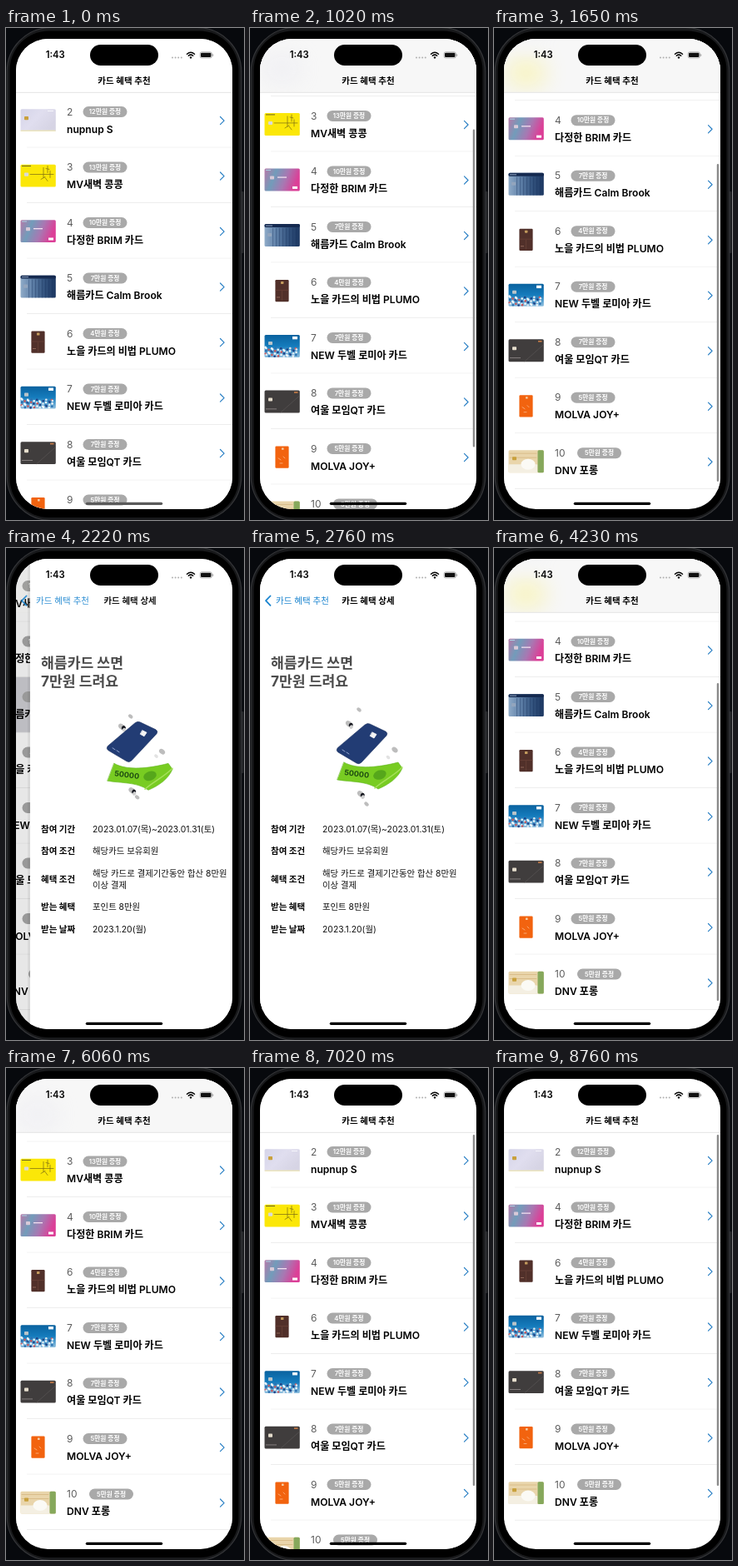
An HTML page that plays this animation: 286 px wide and 590 px high, repeating every 8.82 s.

```html
<!DOCTYPE html>
<html lang="ko">
<head>
<meta charset="utf-8">
<title>카드 혜택 추천</title>
<style>
html, body { margin: 0; width: 100%; height: 100%; overflow: hidden; background: #07090d; }
svg { display: block; width: 100%; height: 100%; }
text { font-family: Inter, "Noto Sans CJK KR", "Noto Sans CJK JP", "Noto Sans CJK", sans-serif; }
.name { font-size: 12.1px; font-weight: 600; }
.num { font-size: 12px; fill: #5c5c5c; }
.prize { font-size: 7.7px; font-weight: 600; fill: #fff; text-anchor: middle; }
.nav { font-size: 10.5px; }
.mid { text-anchor: middle; }
.bold { font-weight: 600; }
.head { font-size: 17.2px; font-weight: 700; fill: #4c4c4c; }
.label { font-size: 10.5px; font-weight: 700; }
.value { font-size: 10.4px; fill: #111; }
</style>
</head>
<body>
<svg id="stage" viewBox="0 0 286 590"></svg>
<script>
const LOOP = 8820, ROW = 66.5, TOP = 77;
const BLUE = '#1a84cf';

const clamp = x => Math.min(1, Math.max(0, x));
const smooth = x => x * x * (3 - 2 * x);
const seg = (t, a, b) => clamp((t - a) / (b - a));
const ease = (t, a, b) => smooth(seg(t, a, b));
const spring = x => x >= 1 ? 1 : 1 - (1 + 9 * x) * Math.exp(-9 * x);
const mix = (a, b, p) => a + (b - a) * p;

const rect = (x, y, w, h, fill, r = 0, more = '') =>
  `<rect x="${x}" y="${y}" width="${w}" height="${h}" rx="${r}" fill="${fill}" ${more}/>`;
const path = (d, stroke, w = 1, more = 'fill="none"') =>
  `<path d="${d}" stroke="${stroke}" stroke-width="${w}" stroke-linecap="round" stroke-linejoin="round" ${more}/>`;
const text = (x, y, cls, s, more = '') => `<text x="${x}" y="${y}" class="${cls}" ${more}>${s}</text>`;
const many = (n, f) => Array.from({ length: n }, (_, i) => f(i)).join('');
const gradient = (id, dir, ...colors) => `<linearGradient id="${id}" ${dir}>` +
  colors.map((c, i) => `<stop offset="${i / (colors.length - 1)}" stop-color="${c}"/>`).join('') +
  '</linearGradient>';

const wide = (fill, inner) => rect(17.5, 20.2, 42.3, 26.8, fill, 1.5) + inner;
const tall = (fill, inner) => rect(30.4, 20.6, 16.2, 26.2, fill, 1.2) + inner;
const chip = (x, y, c = '#c9a13c') => rect(x, y, 5, 4.2, c, .8);

// Card art in row coordinates
const art = {
  lilac: wide('url(#lilac)', chip(22, 29) + rect(17.5, 45.6, 42.3, 1.4, '#ece5bd', .7) +
    rect(50, 22, 7, 1, '#f5f5fb')),
  yellow: wide('#fbe708', chip(22, 30, '#d9dadb') + rect(19, 21.5, 11, 1, '#6d6420') +
    path('M29 32H57 M45 24v12 M50 22v8 M53 28v8 M42 38l5-3 M48 25l4 1 M47 36l3 4', '#7a6a14', .7)),
  flex: wide('url(#flex)', chip(24, 29, '#d8c9d8') + rect(33, 30, 11, 1.3, '#f3dff0') +
    rect(19, 21.5, 6, 1, '#a9d3e4') + rect(51, 41.5, 6, 3, '#fff')),
  navy: wide('url(#navy)', many(8, i => rect(27 + i * 4, 25, .7, 22, '#16305a', 0, 'opacity=".5"')) +
    rect(17.5, 20.2, 42.3, 3.8, '#152a50', 1.5) + rect(19, 21.7, 8, .9, '#9db1cc') + chip(21, 31, '#93a5bd')),
  brown: tall('#51302a', rect(37, 22.5, 3.4, 3, '#c29a5c', .6) + path('M31 33H46 M38.500 34v11', '#75483d', .5) +
    rect(32, 41, 4, 1, '#8d6456')),
  blue: wide('url(#blue)', many(46, i => `<circle cx="${18.5 + (i * 7.3) % 40}" cy="${35 + (i * 4.7) % 11}" r="1.3"
    fill="${['#f2f5f8', '#1d3f86', '#dfe9f2', '#f2f5f8', '#2c6fb0', '#c9565c'][i % 6]}"/>`) +
    chip(22, 28, '#b9c4c9') + rect(51, 22, 6, 3.4, '#fff')),
  dark: wide('#403d3d', chip(22, 29, '#e4dccb') + path('M37 46.500L59 27', '#5a5555', .7) +
    rect(19, 42, 13, .9, '#8b8585') + rect(53, 21.8, 4.5, 1.6, '#c97c46')),
  orange: tall('#f2630f', rect(38, 22.5, 2.6, 2.4, '#f5cda4', .5) +
    path('M34 35l3 2 M40 33l2 2 M36 41h3', '#fbc49c', .7)),
  wood: wide('#e9d5ab', rect(17.5, 37, 35, 10, '#f4efe2', 1) + rect(52.5, 20.2, 7.3, 26.8, '#86a85c', 1.5) +
    path('M19 24H51 M19 29H51', '#cfae75', .6) + chip(22, 28) +
    '<ellipse cx="41" cy="37" rx="8.500" ry="6.500" fill="#fbfaf5"/>')
};

const cards = [
  [2, '12만원', 'nupnup S', 'lilac', '#d9d8ea'],
  [3, '13만원', 'MV새벽 콩콩', 'yellow', '#ffec00'],
  [4, '10만원', '다정한 BRIM 카드', 'flex', '#b57aa8'],
  [5, '7만원', '해름카드 Calm Brook', 'navy', '#4a6486'],
  [6, '4만원', '노을 카드의 비법 PLUMO', 'brown', '#51302a'],
  [7, '7만원', 'NEW 두벨 로미아 카드', 'blue', '#2f7fb8'],
  [8, '7만원', '여울 모임QT 카드', 'dark', '#403d3d'],
  [9, '5만원', 'MOLVA JOY+', 'orange', '#f2630f'],
  [10, '5만원', 'DNV 포롱', 'wood', '#e9d5ab']
];

function row([num, prize, name, kind], i) {
  const bx = num > 9 ? 100 : 92.5;
  return `<g id="row${i}">
    <g id="red${i}">${rect(12, 0, 260, ROW, '#ff3b30')}
      ${text(235, 37, 'value mid', '삭제', 'style="fill:#fff"')}</g>
    <g id="face${i}">${rect(12, 0, 262, ROW, '#fff', 0, `id="back${i}"`)}
      ${art[kind]}
      ${text(73, 27.6, 'num', num)}
      ${rect(bx, 17, 53, 13, '#a9a9a9', 6.5)}
      ${text(bx + 26.5, 26.3, 'prize', prize + ' 증정')}
      ${text(73, 48.6, 'name', name)}
      ${path('M257.500 29.500l4.600 4.600l-4.600 4.600', '#2b80c5', 1.2)}
    </g>
    ${rect(25, ROW - .7, 247, .7, '#e6e6e6')}</g>`;
}

const info = [
  [341, '참여 기간', '2023.01.07(목)~2023.01.31(토)'],
  [367.3, '참여 조건', '해당카드 보유회원'],
  [400.5, '혜택 조건', '해당 카드로 결제기간동안 합산 8만원', '이상 결제'],
  [434, '받는 혜택', '포인트 8만원'],
  [461, '받는 날짜', '2023.1.20(월)']
];
const infoRow = ([y, label, a, b]) => text(25, y, 'label', label) +
  (b ? text(87, y - 7, 'value', a) + text(87, y + 7, 'value', b) : text(87, y, 'value', a));

// x, y, radius, dark side
const coins = [[131, 194, 3, 0], [119, 211, 4.5, 1], [174, 242, 4, 0], [166, 251, 2.6, 0], [133, 295, 4.5, 1], [140, 307, 3, 0]];
const coin = ([x, y, r, dark], i) => `<g id="coin${i}"><g transform="translate(${x} ${y}) rotate(40)">
  <ellipse rx="${r}" ry="${r * .7}" fill="${i === 3 ? '#e2e2e2' : '#bdbdbd'}"/>
  ${dark ? `<ellipse cx="2.6" cy="-.4" rx="2.4" ry="2.6" fill="#15171f"/><ellipse cx="4.4" cy="1" rx="2" ry="2.4" fill="#d0d0d0"/>` : ''}</g></g>`;

const detail = `<g id="detail">${rect(9, 13, 3, 564, '#000', 0, 'opacity=".06"')}${rect(12, 13, 262, 564, '#fff')}
  ${text(25, 144, 'head', '해름카드 쓰면')}${text(25, 166, 'head', '7만원 드려요')}
  ${coins.map(coin).join('')}
  <g id="bill">${path('M113 257C128 266 155 263 178 257L183 264C178 276 166 284 154 289C140 279 122 281 105 278Z', '#5fb41c', .6, 'fill="#78cc22"')}
    ${path('M150 288C158 280 172 274 183 263', '#a5e05a', 1.5)}
    <ellipse cx="156" cy="272" rx="8" ry="5.5" fill="#56a71b" transform="rotate(-20 156 272)"/>
    <text x="113" y="272" font-size="9" font-weight="700" fill="#1f4d12" transform="rotate(7 113 272)">50000</text></g>
  <g id="plate">${path('M138 212Q141 209.500 144 211L163 220Q166 222 164 225L134 257Q131 260 128 258L106 245Q103 243 105 240Z', '#1a2f5e', .6, 'fill="#223c74"')}
    ${path('M147 221l5 2.500l-3 4.500l-4.500-2.500z', '#fff', .8, 'fill="#f4f4f4"')}
    ${path('M111 242l3 2 M116 245l3 2', '#93a6cf', 1)}</g>
  ${info.map(infoRow).join('')}</g>`;

const statusBar = text(47.7, 36.4, 'nav bold', '1:43', 'style="font-size:11.300px"') +
  rect(101, 20, 82, 25, '#000', 12.5) +
  many(4, i => `<circle cx="${200 + i * 3.6}" cy="35.500" r="1" fill="#b0b0b0"/>`) +
  path('M217.500 31.300q4.500-4 9 0 M219.300 33.300q2.700-2.300 5.400 0', '#000', 1.5) +
  '<circle cx="222" cy="35.400" r="1.200"/>' +
  rect(233, 28.8, 14.5, 7.2, 'none', 2.2, 'stroke="#999" stroke-width=".7"') +
  rect(234, 29.8, 12.5, 5.2, '#111', 1.3) + rect(248.2, 31.2, 1, 2.6, '#999', .5);

document.getElementById('stage').innerHTML = `
  <defs>
    <clipPath id="screen">${rect(12, 13, 260, 564, '#000', 38.5)}</clipPath>
    <clipPath id="bar">${rect(12, 13, 260, 64, '#000')}</clipPath>
    <filter id="blur" x="-1" y="-1" width="3" height="3"><feGaussianBlur stdDeviation="14"/></filter>
    ${gradient('lilac', 'x2="1" y2=".6"', '#d5d4e8', '#e0deef', '#d6d4e4')}
    ${gradient('flex', 'x2="1" y2=".25"', '#b878a8', '#729cba', '#a878b2', '#dc3f97')}
    ${gradient('navy', 'x2="1" y2="0"', '#8fabc8', '#5f80a8', '#34547f', '#1c3761')}
    ${gradient('blue', 'x2="0" y2="1"', '#0a629f', '#157cbd', '#8fbfde')}
  </defs>
  ${rect(0, 0, 286, 590, '#07090d')}
  ${rect(282.5, 196, 3, 74, '#26272a', 1)}
  ${rect(1.2, -.5, 281.6, 591, '#18191b', 53, 'stroke="#343538" stroke-width="1.200"')}
  ${rect(4.5, 3.5, 275, 583.5, '#000', 47)}
  <g clip-path="url(#screen)">
    ${rect(12, 13, 260, 564, '#fff')}
    <g id="list">${cards.map(row).join('')}
      ${rect(267.8, 0, 2.3, 381, '#8c8c8c', 1.1, 'id="thumb"')}</g>
    ${rect(12, 13, 260, 564, '#000', 0, 'id="dim"')}
    <g id="header">${rect(12, 13, 260, 64, '#fff')}
      <g id="tint" clip-path="url(#bar)">${rect(12, 13, 260, 64, '#f7f7f7')}
        <g filter="url(#blur)" opacity=".26">${cards.map((c, i) => rect(17, 0, 43, 28, c[4], 0, `id="glow${i}"`)).join('')}</g></g>
      ${rect(12, 76.9, 260, .7, '#dadada')}</g>
    ${detail}
    ${text(142, 66.6, 'nav mid bold', '카드 혜택 추천', 'id="listTitle"')}
    ${text(142, 66.6, 'nav mid bold', '카드 혜택 상세', 'id="pageTitle"')}
    <g id="back">${path('M24.500 57.500l-5.500 5.700l5.500 5.700', BLUE, 1.8)}
      ${text(31, 66.6, 'nav', '카드 혜택 추천', `id="backText" fill="${BLUE}"`)}</g>
    ${statusBar}
    ${rect(95.8, 568.7, 92.4, 3.2, '#000', 1.6, 'id="home"')}
  </g>`;

const nodes = {};
document.querySelectorAll('#stage [id]').forEach(n => nodes[n.id] = n);
const set = (id, attrs) => { for (const k in attrs) nodes[id].setAttribute(k, attrs[k]); };
const move = (id, x, y) => set(id, { transform: `translate(${x.toFixed(2)} ${y.toFixed(2)})` });
const show = (id, on) => set(id, { display: on ? 'inline' : 'none' });

// Row index: swipe start, swipe end, collapse start, collapse end
const removals = { 3: [4410, 4920, 4860, 5280], 1: [7260, 7620, 7560, 7920] };

function scrollAt(t) {
  if (t < 1230) return mix(0, 138, ease(t, 840, 1230));
  if (t < 4410) return mix(138, 121.5, ease(t, 1230, 1740));
  if (t < 6330) return mix(121.5, 55, ease(t, 4860, 5280));
  if (t < 6690) return mix(55, -10, ease(t, 6330, 6690));
  return mix(-10, 0, ease(t, 6690, 7020));
}

function thumbAt(t) {
  if (t < 3000) return seg(t, 840, 900) * (1 - seg(t, 1950, 2250));
  if (t < 6000) return seg(t, 3660, 3780) * (1 - seg(t, 4410, 4650));
  return seg(t, 6330, 6390);
}

function draw(t) {
  const scroll = scrollAt(t);
  let y = TOP - scroll;
  cards.forEach((c, i) => {
    const r = removals[i];
    const gone = r ? ease(t, r[2], r[3]) : 0;
    const swipe = r ? ease(t, r[0], r[1]) : 0;
    move('row' + i, 0, y);
    show('row' + i, gone < 1);
    set('glow' + i, { y: y + 19.5, opacity: 1 - gone });
    move('face' + i, -262 * swipe, 0);
    show('red' + i, swipe > 0);
    y += ROW * (1 - gone);
  });

  const lit = seg(t, 1890, 1950) * (1 - seg(t, 3720, 4140));
  set('back3', { fill: `rgb(${[46, 46, 41].map(d => Math.round(255 - lit * d))})` });

  set('thumb', { y: 80 + Math.max(0, scroll) * .675, height: t < 5000 ? 381 : 421, opacity: thumbAt(t) });
  set('tint', { opacity: clamp(scroll / 10) });
  set('home', { fill: t < 840 ? '#5a5a5a' : '#000' });

  const page = t < 3200 ? spring(seg(t, 1950, 2500)) : 1 - spring(seg(t, 3210, 3780));
  move('list', -78 * page, 0);
  move('detail', 264 * (1 - page), 0);
  show('detail', page > .001);
  set('dim', { opacity: .1 * page });
  set('header', { opacity: 1 - page });
  move('listTitle', -79 * page, 0);
  set('listTitle', { opacity: clamp(1 - page * 1.6) });
  move('pageTitle', 110 * (1 - page), 0);
  set('pageTitle', { opacity: clamp(page * 1.6 - .6) });
  move('backText', 79 * (1 - page), 0);
  set('back', { opacity: clamp(page * 1.6 - .6) });

  const age = t - 2760;
  move('plate', 0, 2.5 * Math.sin(age / 260));
  move('bill', 0, -1.5 * Math.sin(age / 260));
  coins.forEach(([x, cy], i) => {
    const k = age / 4500;
    move('coin' + i, (x - 145) * k, (cy - 250) * k + 2 * Math.sin(age / 220) * (i % 2 ? 1 : -1));
  });
}

const start = performance.now();
function tick() {
  draw((performance.now() - start) % LOOP);
  requestAnimationFrame(tick);
}
tick();
</script>
</body>
</html>
```
